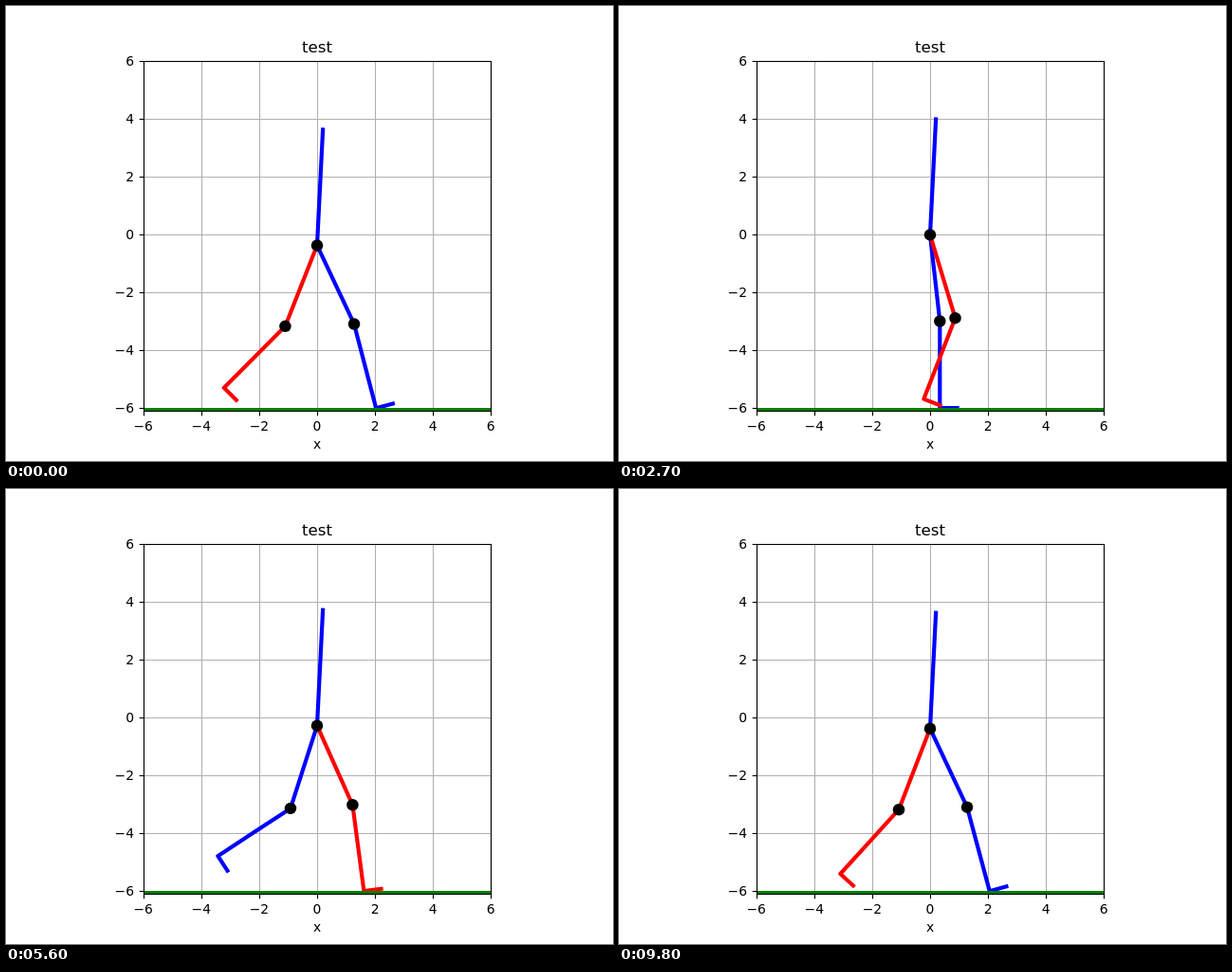
Recreate the animation shown at these times as an HTML page. Size 640 px wide and 480 px high, loop 9900 ms.

```html
<!DOCTYPE html>
<html lang="en">
<head>
<meta charset="utf-8">
<title>test</title>
<style>
  html, body { margin: 0; width: 100%; height: 100%; overflow: hidden; background: #fff; }
  svg { display: block; width: 640px; height: 480px; }
  text { font: 13.89px "DejaVu Sans", sans-serif; }
  .title { font-size: 16.67px; }
  .mid { text-anchor: middle; }
  .end { text-anchor: end; }
  .grid { stroke: #b0b0b0; stroke-width: 1.11; }
  .axis { stroke: #000; stroke-width: 1.11; fill: none; }
  .limb { fill: none; stroke-width: 4.17; stroke-linecap: square; stroke-linejoin: round; }
</style>
</head>
<body>
<svg id="stage" viewBox="0 0 640 480"></svg>
<script>
const STEP = 100, STEPS = 99;
const UNIT = 369.6 / 12.1;
const THIGH = 3, SHANK = 3, FOOT = 0.6, TORSO = 4, FLOOR = -6;
const X = x => 328 + x * UNIT;
const Y = y => 57.6 + (6 - y) * UNIT;
const snap = v => Math.floor(v + 0.5) + 0.5;

// Gait cycle: [percent, thigh angle, knee flexion] in degrees
const GAIT = [
  [0, 25.2, 10.6], [6.57, 24.1, 16.6], [12, 22, 20], [18.18, 17.2, 17.2],
  [22.73, 11.5, 11.2], [35.35, -3.1, 3.5], [38.89, -8.7, 5.6], [44, -15.8, 11],
  [48.99, -21.1, 21.2], [50, -21.5, 23.3], [56.57, -17.8, 38.9], [63, -6.4, 56],
  [68.18, 3.8, 55.7], [72.73, 11, 48], [79, 18.6, 34], [85.35, 23, 19.2],
  [88.89, 24.4, 13.6], [94, 25.5, 6], [98.99, 25.2, 10.2]
];

const stage = document.getElementById('stage');
function add(tag, attrs, text) {
  const el = document.createElementNS('http://www.w3.org/2000/svg', tag);
  for (const k in attrs) el.setAttribute(k, attrs[k]);
  if (text) el.textContent = text;
  return stage.appendChild(el);
}
const line = (cls, x1, y1, x2, y2) => add('line', { class: cls, x1, y1, x2, y2 });
const label = (cls, x, y, s) => add('text', { class: cls, x, y }, s);

const left = snap(X(-6)), right = snap(X(6)), top_ = snap(Y(6)), bottom = snap(Y(-6.1));
const ticks = [-6, -4, -2, 0, 2, 4, 6];
for (const v of ticks) {
  line('grid', snap(X(v)), top_, snap(X(v)), bottom);
  line('grid', left, snap(Y(v)), right, snap(Y(v)));
}

const limb = stroke => add('path', { class: 'limb', stroke });
const torso = limb('#00f'), blueLeg = limb('#00f'), redLeg = limb('#f00');
add('rect', { x: left, y: 424, width: right - left, height: 3.5, fill: '#008000' });
const dot = () => add('circle', { r: 6.25 });
const hipDot = dot(), blueKnee = dot(), redKnee = dot();

for (const v of ticks) {
  const s = String(v).replace('-', '\u2212');
  line('axis', snap(X(v)), bottom, snap(X(v)), bottom + 4.86);
  line('axis', left - 4.86, snap(Y(v)), left, snap(Y(v)));
  label('mid', X(v), 448, s);
  label('end', 135, Y(v) + 5.2, s);
}
add('rect', { class: 'axis', x: left, y: top_, width: right - left, height: bottom - top_ });
label('mid title', 328, 49.3, 'test');
label('mid', 328, 467, 'x');

// Key i of the endless cycle
function key(i, col) {
  const n = GAIT.length, k = GAIT[(i + n) % n];
  return [k[0] + 100 * Math.floor(i / n), k[col]];
}

function tangent(i, col) {
  const [a, va] = key(i - 1, col), [b, vb] = key(i, col), [c, vc] = key(i + 1, col);
  return ((vb - va) / (b - a) * (c - b) + (vc - vb) / (c - b) * (b - a)) / (c - a);
}

function curve(p, col) {
  let i = GAIT.length - 1;
  while (GAIT[i][0] > p) i--;
  const [a, va] = key(i, col), [b, vb] = key(i + 1, col);
  const h = b - a, u = (p - a) / h, w = 1 - u;
  return w * w * (1 + 2 * u) * va + u * u * (3 - 2 * u) * vb
    + h * u * w * (w * tangent(i, col) - u * tangent(i + 1, col));
}

// Hip, knee, ankle and toe relative to the hip
function leg(phase) {
  const p = phase % 100, rad = Math.PI / 180;
  const thigh = curve(p, 1) * rad, shank = thigh - curve(p, 2) * rad;
  const knee = [THIGH * Math.sin(thigh), -THIGH * Math.cos(thigh)];
  const ankle = [knee[0] + SHANK * Math.sin(shank), knee[1] - SHANK * Math.cos(shank)];
  const toe = [ankle[0] + FOOT * Math.cos(shank), ankle[1] + FOOT * Math.sin(shank)];
  return [[0, 0], knee, ankle, toe];
}

function draw(step) {
  const phase = step / STEPS * 100;
  const blue = leg(phase), red = leg(phase + 50);
  const hip = FLOOR - Math.min(...blue.concat(red).map(q => q[1]));
  const path = (el, pts) => el.setAttribute('d',
    'M' + pts.map(([x, y]) => X(x).toFixed(2) + ' ' + Y(y + hip).toFixed(2)).join('L'));
  const place = (el, [x, y]) => {
    el.setAttribute('cx', X(x));
    el.setAttribute('cy', Y(y + hip));
  };
  path(torso, [[0, 0], [TORSO * Math.sin(0.05), TORSO * Math.cos(0.05)]]);
  path(blueLeg, blue);
  path(redLeg, red);
  place(hipDot, [0, 0]);
  place(blueKnee, blue[1]);
  place(redKnee, red[1]);
}

const start = performance.now();
function tick() {
  draw(Math.floor((performance.now() - start) / STEP) % STEPS);
  requestAnimationFrame(tick);
}
tick();
</script>
</body>
</html>
```
